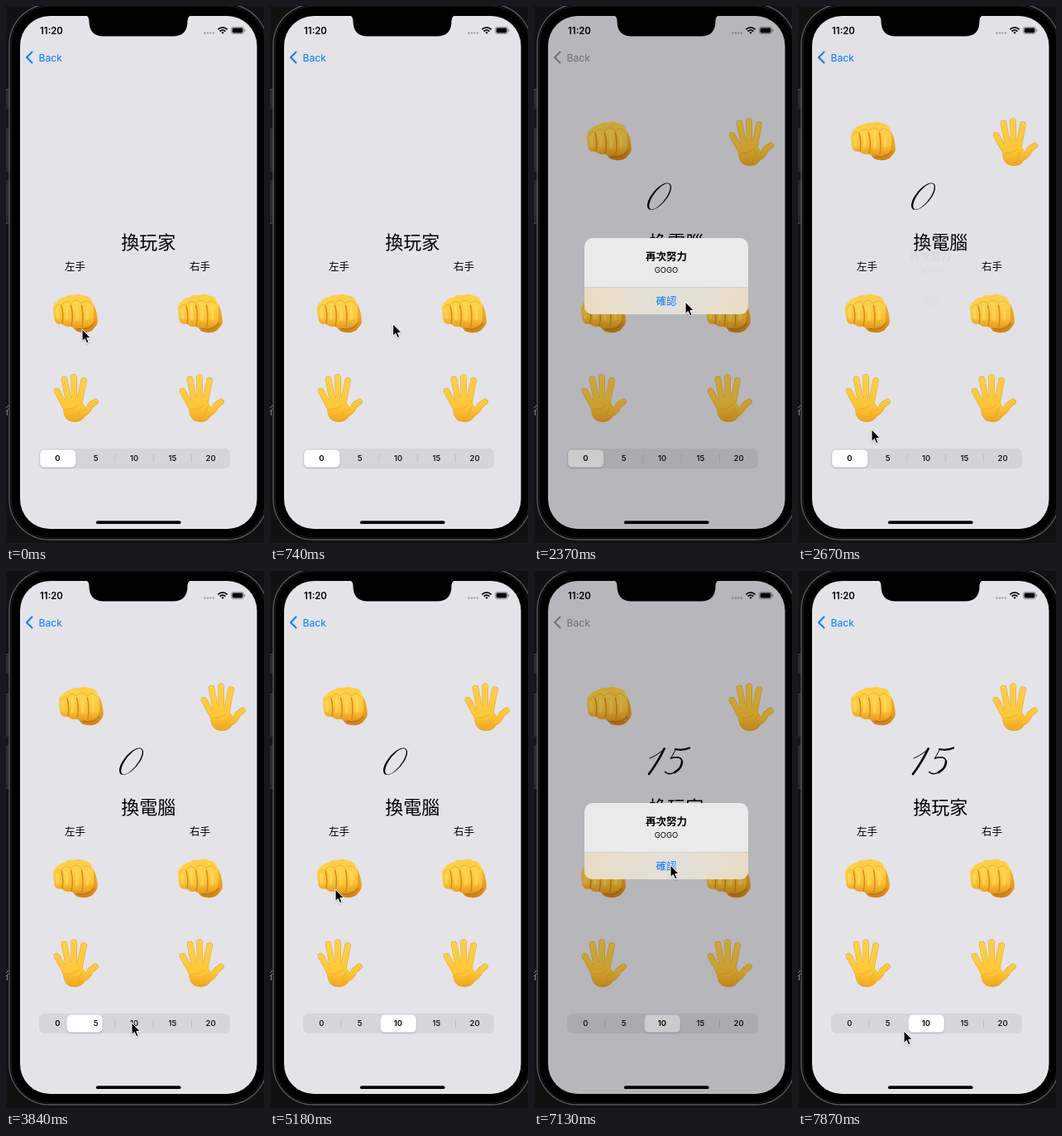
Write an HTML page that moves like this. It is 312x648 px and loops after 8 s.

```html
<!DOCTYPE html>
<html lang="zh-Hant">
<head>
<meta charset="utf-8">
<title>Hand game</title>
<style>
html, body { margin: 0; width: 100%; height: 100%; overflow: hidden; background: #090909; }
svg { display: block; width: 312px; height: 648px; }
text { font-family: Inter, "Noto Sans CJK TC", "Noto Sans CJK", sans-serif; }
.mid { text-anchor: middle; }
.cjk { font-family: "Noto Sans CJK TC", "Noto Sans CJK", sans-serif; }
.small { font-size: 12.5px; }
.bold { font-weight: 600; }
</style>
</head>
<body>
<svg viewBox="0 0 312 648">
  <defs>
    <linearGradient id="skin" gradientUnits="userSpaceOnUse" x1="0" y1="0" x2="0" y2="58">
      <stop offset="0" stop-color="#ffd24a"/><stop offset=".7" stop-color="#fec638"/><stop offset="1" stop-color="#efa621"/>
    </linearGradient>
    <linearGradient id="knuckles" gradientUnits="userSpaceOnUse" x1="0" y1="0" x2="0" y2="41">
      <stop offset="0" stop-color="#ffcd43"/><stop offset=".3" stop-color="#ffd34a"/>
      <stop offset=".7" stop-color="#fdc136"/><stop offset="1" stop-color="#e59a1c"/>
    </linearGradient>
    <linearGradient id="thumbShade" x1="0" y1="0" x2="0" y2="1">
      <stop offset="0" stop-color="#f5b52c"/><stop offset=".6" stop-color="#e8a023"/><stop offset="1" stop-color="#cd8217"/>
    </linearGradient>
    <linearGradient id="frost">
      <stop offset="0" stop-color="#e9dcc2"/><stop offset=".3" stop-color="#e6dfd1"/>
      <stop offset=".55" stop-color="#e3e0db"/><stop offset="1" stop-color="#e8dcc4"/>
    </linearGradient>
    <filter id="soft" x="-30%" y="-30%" width="160%" height="170%">
      <feDropShadow dx="0" dy="1" stdDeviation="1" flood-opacity=".2"/>
    </filter>
    <clipPath id="card"><rect x="61" y="280" width="198" height="92" rx="10"/></clipPath>

    <g id="fist" stroke-linecap="round">
      <path d="M25 38Q26 45 36 46Q47 47 51 40Q56 36 54.500 28Q53 15 47 8L40 28Z" fill="url(#thumbShade)"/>
      <path d="M31 41.500Q44 44 50 35" fill="none" stroke="#b97514" stroke-width="1.3"/>
      <path d="M1 20Q0 12 5 9Q9 4 15 3.500Q20-.5 26 1Q33-1.500 39 1.500Q47 2 49 11Q51 22 49.500 32Q47 39 42 39Q37 42 32 40Q27 42 22 38.500Q16 40 11.500 35.500Q4 37 2.500 31Z" fill="url(#knuckles)"/>
      <path d="M11 14Q14 25 12 35M22.500 13Q26 26 23 38M35.500 13Q38 26 36 39" fill="none" stroke="#cf8a1b" stroke-width="1.5"/>
      <path d="M4 16Q6 10 11 13Q16 5 22 11Q29 3 35 11Q42 4 47 12" fill="none" stroke="#eeb033" stroke-width="1"/>
      <path d="M6 19Q7 24 6.500 28M17 16Q18.500 23 17.500 29M29 16Q31 23 30 30M41.500 16Q43 23 42.500 29" fill="none" stroke="#ffdc62" stroke-width="3.5" opacity=".7"/>
    </g>

    <path id="digits" d="M15 40L4.500 20.500M19 34L13.500 6.500M25.500 33L25 4M32 34L37 8M37 48Q43 44 45 38L51 33.500"/>
    <path id="palm" d="M11.500 35Q16 28 26 28.500Q34 28 36 36L41 43Q38 58 26.500 58Q14.500 58 12.500 46Z"/>
    <g id="hand" stroke-linecap="round" stroke-linejoin="round" fill="none">
      <use href="#digits" stroke="#dd9f2a" stroke-width="7.400"/>
      <use href="#palm" fill="#de9b20"/>
      <use href="#digits" stroke="url(#skin)" stroke-width="6.500"/>
      <use href="#palm" fill="url(#skin)" transform="translate(.5 .3) scale(.98)"/>
      <path d="M15 43Q23 43 31 38M36 39Q30 45 31 52" stroke="#eeb02f" stroke-width="1"/>
    </g>
  </defs>

  <rect width="312" height="648" fill="#111"/>
  <path d="M0 100H5V262H0Z" fill="#2b2b2c"/>
  <path d="M0 100.5H5M0 148.5H5M0 262.5H5" stroke="#444"/>
  <path d="M0 124H5V148H0ZM0 200H5V210H0Z" fill="#171717"/>
  <path d="M0 485L3 482M0 489L3 486M1.5 488V494" stroke="#888" fill="none"/>
  <rect x="4" y="-2" width="312" height="646" rx="49" stroke="#57595c" stroke-width="1.4"/>
  <rect x="6" y="0" width="308" height="642" rx="47" fill="none" stroke="#1d1d1e"/>

  <rect x="17" y="12" width="286.500" height="619" rx="36" fill="#e4e3e8"/>
  <text x="41" y="34" font-size="11.4" class="bold">11:20</text>
  <g fill="#a5a5aa">
    <circle cx="240.5" cy="32.5" r="1.2"/><circle cx="244" cy="32.5" r="1.2"/>
    <circle cx="247.5" cy="32.5" r="1.2"/><circle cx="251" cy="32.5" r="1.2"/>
  </g>
  <g fill="none" stroke="#000" stroke-width="1.7">
    <path d="M256.3 28.3Q262 23.3 267.7 28.3M258.5 30.6Q262 27.6 265.5 30.6"/>
    <path d="M260.4 31.9L262 33.7L263.6 31.9Q262 30.6 260.4 31.9Z" fill="#000" stroke="none"/>
  </g>
  <rect x="272.4" y="25.4" width="15.2" height="8.2" rx="2.4" fill="none" stroke="#88888c" stroke-width=".8"/>
  <rect x="273.6" y="26.6" width="12.8" height="5.8" rx="1.4"/>
  <path d="M288.8 28v3" stroke="#88888c" stroke-width="1.1"/>

  <g id="back">
    <path d="M31.5 55.5L25 62L31.5 68.5" fill="none" stroke="currentColor" stroke-width="1.9" stroke-linecap="round" stroke-linejoin="round"/>
    <text x="39.5" y="66.8" font-size="12.2" fill="currentColor">Back</text>
  </g>

  <g id="result">
    <use href="#fist" x="63" y="140"/>
    <use href="#hand" x="235" y="135"/>
    <g id="zero" transform="translate(151.5 229.8) skewX(-31)">
      <path fill-rule="evenodd" d="M-10.8 0A10.8 16.2 0 1 1 10.8 0A10.8 16.2 0 1 1-10.8 0ZM-8.200 0A8.700 15.600 0 1 0 9.200 0A8.700 15.600 0 1 0-8.200 0Z"/>
    </g>
    <g id="fifteen" fill="none" stroke="#000" stroke-linecap="round">
      <path d="M140 226Q150 222 158 214" stroke-width="1"/>
      <path d="M157.500 214.500Q149 232 139 245" stroke-width="2.700"/>
      <path d="M171 215Q180 217 188 213.500" stroke-width="2.200"/>
      <path d="M171.500 215L165.500 226" stroke-width="1"/>
      <path d="M165.500 226Q179 222 179 231" stroke-width="1.700"/>
      <path d="M179 230Q179 238 170 243" stroke-width="2.600"/>
      <path d="M171 242.500Q163 247 158.500 242.500" stroke-width="1.400"/>
    </g>
  </g>

  <text id="turn" x="172.3" y="292.5" font-size="22" class="cjk mid"></text>
  <text x="83.5" y="319.4" class="cjk mid small">左手</text>
  <text x="234.5" y="319.4" class="cjk mid small">右手</text>
  <use id="leftFist" href="#fist" x="56" y="348"/>
  <use id="rightFist" href="#fist" x="207" y="348"/>
  <use href="#hand" x="57" y="444"/>
  <use href="#hand" x="209" y="444"/>

  <rect x="40" y="534" width="231" height="24" rx="6.5" fill="#d6d5da"/>
  <g id="dividers" stroke="#bdbdc3"></g>
  <rect id="thumb" x="41.2" y="535.5" width="43" height="21" rx="5.2" fill="#fff" filter="url(#soft)"/>
  <g id="options" class="mid" font-size="9.5"></g>
  <rect x="109" y="621.3" width="102.5" height="3.8" rx="1.9"/>

  <rect id="dim" x="17" y="12" width="286.500" height="619" rx="36"/>
  <path d="M95 11H225Q219.500 12 219.500 18Q219.500 36.500 202 36.500H118Q100.500 36.500 100.500 18Q100.500 12 95 11Z"/>

  <g id="alert">
    <g clip-path="url(#card)">
      <rect x="61" y="280" width="198" height="92" fill="#eaeaeb"/>
      <rect id="tint" x="61" y="339.5" width="198" height="33" fill="url(#frost)"/>
      <path d="M61 339.5H259" stroke="#c9c8c8" stroke-width=".8"/>
    </g>
    <text x="160" y="306.8" class="cjk mid small bold">再次努力</text>
    <text x="160" y="321.5" font-size="9.4" class="mid">GOGO</text>
    <text x="160" y="360.7" fill="#0a7aff" class="cjk mid small">確認</text>
  </g>

  <path id="cursor" d="M0 0V14.5L3.3 11.5L5.6 16.8L8.1 15.7L5.8 10.6H10.3Z" stroke="#fff" stroke-width="1" filter="url(#soft)"/>
</svg>
<script>
const LOOP = 8000;
const $ = id => document.getElementById(id);

// Bursts of evenly spaced picture updates: first, last, count
const bursts = [[300, 1180, 7], [1480, 2520, 8], [2670, 3700, 8], [3840, 4290, 4],
                [5180, 6080, 7], [6230, 7270, 8], [7420, 7870, 4]];
const ticks = [0, ...bursts.flatMap(([from, to, n]) =>
  Array.from({ length: n }, (_, i) => Math.round((from + (to - from) * i / (n - 1)) / 10) * 10))];

// Steps are [time, value, ...]
const cursorPath = [
  [0, 92, 390], [450, 92, 390], [600, 110, 387], [890, 190, 380], [1180, 239, 375],
  [1480, 239, 375], [1780, 232, 372], [2220, 183, 357], [2370, 183, 357], [2520, 150, 420],
  [2670, 89, 511], [2970, 100, 530], [3400, 150, 546], [3840, 152, 545], [3990, 125, 480],
  [4140, 85, 338], [4290, 79, 384], [5480, 79, 384], [5780, 180, 375], [5930, 266, 372],
  [6080, 227, 366], [6530, 227, 366], [6830, 200, 360], [7120, 165, 355], [7270, 165, 355],
  [7420, 150, 450], [7570, 135, 530], [7870, 128, 555]];
const alertFade = start => [[start - 1, 0], [start, .04], [start + 150, .3], [start + 300, .8], [start + 450, 1]];
const alertExit = start => [[start, 1], [start + 150, .45], [start + 300, .03], [start + 450, 0]];
const alertSteps = [...alertFade(1480), ...alertExit(2370), ...alertFade(6380), ...alertExit(7120)];
const press = (down, up = down) => [[down - 1, 1], [down, .25], [up, .25], [up + 150, .4], [up + 300, .75], [up + 450, 1]];
const leftPress = [...press(300), ...press(5320)];
const rightPress = [...press(1480), ...press(6230, 6380)];
const slide = [[3700, 0], [3840, .35], [3990, .9], [4140, 1]];

function at(steps, t) {
  const next = steps.findIndex(s => s[0] > t);
  if (next < 0) return steps.at(-1).slice(1);
  if (next === 0) return steps[0].slice(1);
  const a = steps[next - 1], b = steps[next];
  const k = (t - a[0]) / (b[0] - a[0]);
  return a.slice(1).map((v, i) => v + (b[i + 1] - v) * k);
}

const optionX = i => 62.4 + i * 46.3;
$('options').innerHTML = [0, 5, 10, 15, 20].map((n, i) => `<text x="${optionX(i)}" y="549.4">${n}</text>`).join('');
$('dividers').innerHTML = [0, 1, 2, 3].map(i => `<path d="M${optionX(i) + 23.2} 541v10"/>`).join('');

const show = (id, on) => $(id).style.display = on ? '' : 'none';
const mix = (a, b, k) => `rgb(${a.map((v, i) => Math.round(v + (b[i] - v) * k))})`;

function draw(t) {
  const [x, y] = at(cursorPath, t);
  $('cursor').setAttribute('transform', `translate(${x} ${y})`);

  const played = t >= 1480, second = t >= 6380;
  show('result', played);
  show('zero', !second);
  show('fifteen', second);
  $('turn').textContent = played && !second ? '換電腦' : '換玩家';

  $('leftFist').style.opacity = at(leftPress, t)[0];
  $('rightFist').style.opacity = at(rightPress, t)[0];

  const [moved] = at(slide, t);
  const selected = moved > .5 ? 2 : 0;
  $('thumb').setAttribute('transform', `translate(${moved * 92.5} 0)`);
  [...$('options').children].forEach((el, i) => el.setAttribute('font-weight', i === selected ? 600 : 500));
  [...$('dividers').children].forEach((el, i) => el.style.opacity = i === selected || i === selected - 1 ? 0 : 1);

  const [shown] = at(alertSteps, t);
  const entering = t < 2370 || (t >= 6380 && t < 7120);
  const scale = entering ? 1 + .2 * (1 - shown) : 1;
  $('dim').style.opacity = .2 * shown;
  $('back').style.color = mix([0, 122, 255], [139, 139, 144], shown);
  $('alert').style.opacity = shown;
  $('tint').style.opacity = shown;
  $('alert').setAttribute('transform', `translate(160 326) scale(${scale}) translate(-160 -326)`);
}

const start = performance.now();
function frame() {
  const t = (performance.now() - start) % LOOP;
  draw(ticks.findLast(tick => tick <= t));
  requestAnimationFrame(frame);
}
frame();
</script>
</body>
</html>
```
